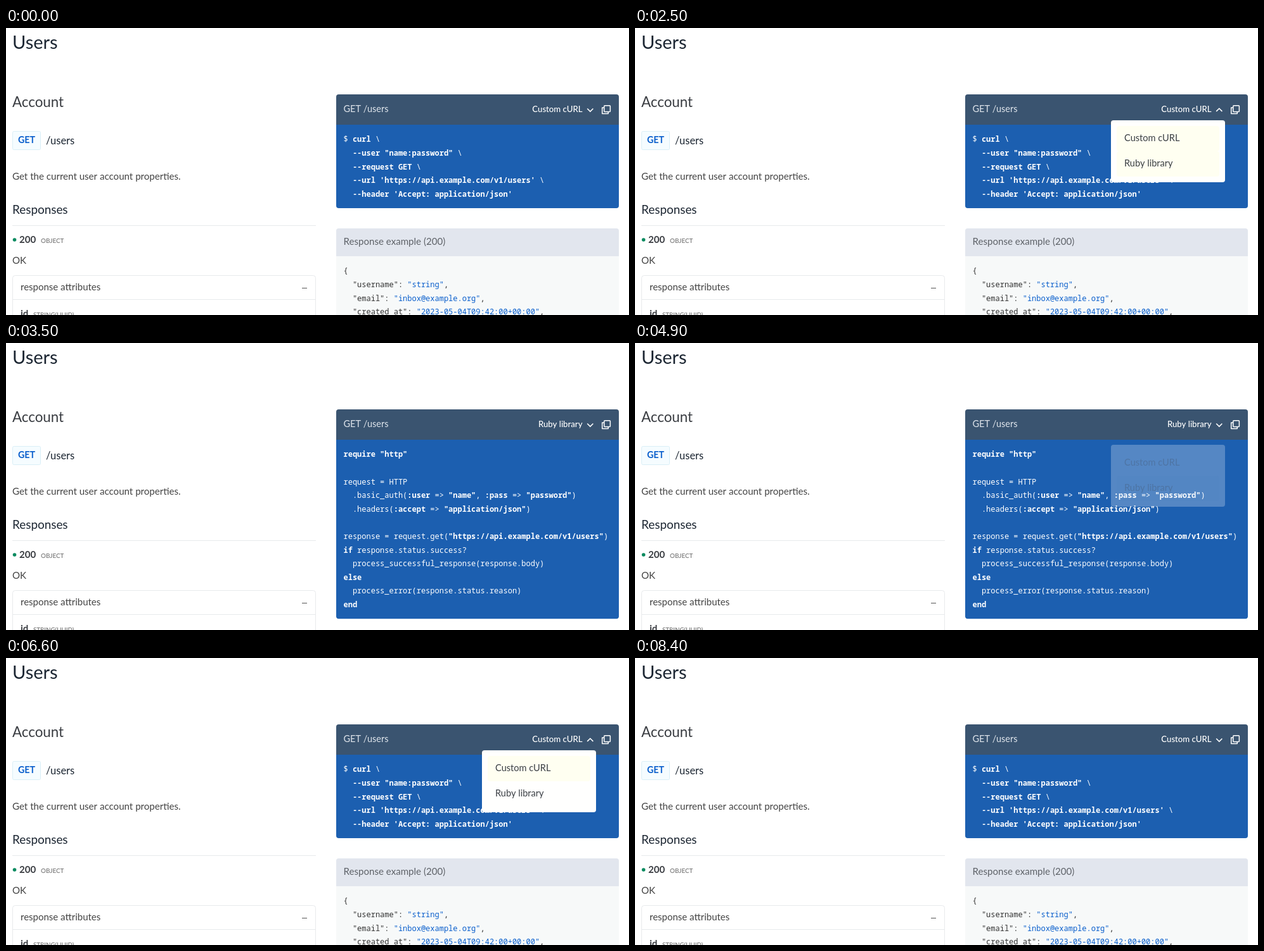
Recreate the animation shown at these times as an HTML page with a canvas. Size 983 px wide and 454 px high, loop 9.4 s.

```html
<!DOCTYPE html>
<html lang="en">
<head>
<meta charset="utf-8">
<title>API reference</title>
<style>
  html, body { margin: 0; width: 100%; height: 100%; overflow: hidden; background: #fff; }
  canvas { display: block; width: 983px; height: 454px; }
</style>
</head>
<body>
<canvas id="stage"></canvas>
<script>
const WIDTH = 983, HEIGHT = 454, LOOP = 9400;
const canvas = document.getElementById('stage');
const ctx = canvas.getContext('2d');
const ratio = window.devicePixelRatio || 1;
canvas.width = WIDTH * ratio;
canvas.height = HEIGHT * ratio;

const SANS = 'Lato, "Open Sans", sans-serif';
const MONO = '"Noto Sans Mono", "DejaVu Sans Mono", monospace';
const INK = '#1d2733', BODY = '#444', LINE = '#e8eaec', LINK = '#0a5fcc';
const HEADER = '#3a5470', PANEL = '#1c5fb0';
const CODE_TOP = 153, LINE_HEIGHT = 21.6, PADDING = 12;

// Asterisks toggle the emphasised style.
const CURL = [
  '$ *curl* \\',
  '  *--user "name:password"* \\',
  '  *--request GET* \\',
  '  *--url \'https://api.example.com/v1/users\'* \\',
  '  *--header \'Accept: application/json\'*'
];
const RUBY = [
  '*require "http"*',
  '',
  'request = HTTP',
  '  .basic_auth(*:user* => *"name"*, *:pass* => *"password"*)',
  '  .headers(*:accept* => *"application/json"*)',
  '',
  'response = request.get(*"https://api.example.com/v1/users"*)',
  '*if* response.status.success?',
  '  process_successful_response(response.body)',
  '*else*',
  '  process_error(response.status.reason)',
  '*end*'
];
const JSON_LINES = [
  '{',
  '  "username": *"string"*,',
  '  "email": *"inbox@example.org"*,',
  '  "created_at": *"2023-05-04T09:42:00+00:00"*,'
];
const LANGUAGES = ['Custom cURL', 'Ruby library'];

// [start time, visibility], held until the next entry
const MENU_STEPS = [
  [0, 0], [1800, 0.75], [1900, 0.96], [2000, 1], [3300, 0.75], [3400, 0.25], [3500, 0],
  [4900, 0.25], [5000, 0.8], [5100, 1], [6700, 0.75], [6800, 0.25], [6900, 0]
];
const TOOLTIP_STEPS = [[0, 0], [7700, 0.4], [7800, 0.8], [7900, 1], [8400, 0]];

const between = (t, from, to) => t >= from && t < to;

function valueAt(steps, t) {
  let value = 0;
  for (const [start, v] of steps) if (t >= start) value = v;
  return value;
}

function text(str, x, y, size, color, weight = 400, align = 'left') {
  ctx.font = `${weight} ${size}px ${SANS}`;
  ctx.textAlign = align;
  ctx.fillStyle = color;
  ctx.fillText(str, x, y);
}

function box(x, y, w, h, radius, fill, stroke) {
  ctx.beginPath();
  ctx.roundRect(x, y, w, h, radius);
  if (fill) {
    ctx.fillStyle = fill;
    ctx.fill();
  }
  if (stroke) {
    ctx.strokeStyle = stroke;
    ctx.lineWidth = 1;
    ctx.stroke();
  }
}

function polyline(points, color, width) {
  ctx.beginPath();
  points.forEach(([x, y]) => ctx.lineTo(x, y));
  ctx.strokeStyle = color;
  ctx.lineWidth = width;
  ctx.stroke();
}

function code(lines, top, plain, strong) {
  ctx.textAlign = 'left';
  lines.forEach((line, row) => {
    const y = Math.round(top + PADDING + 15.3 + row * LINE_HEIGHT);
    let x = 532.5;
    line.split('*').forEach((part, i) => {
      const style = i % 2 ? strong : plain;
      ctx.font = `${style.weight} 12px ${MONO}`;
      ctx.fillStyle = style.color;
      ctx.fillText(part, x, y);
      x += ctx.measureText(part).width;
    });
  });
}

function drawReference() {
  text('Users', 10, 33, 29, INK);
  text('Account', 10, 125, 22.3, '#3a3d42');

  box(10.5, 163.5, 44, 29, 2, '#f5fcff', '#daeff7');
  text('GET', 19, 182, 14.2, LINK, 700);
  text('/users', 63, 184, 16.5, INK);
  text('Get the current user account properties.', 10, 240, 15.1, BODY);

  text('Responses', 10, 294, 18.9, INK);
  polyline([[10, 312.5], [489, 312.5]], LINE, 1);
  ctx.beginPath();
  ctx.arc(13.5, 335, 2.8, 0, 2 * Math.PI);
  ctx.fillStyle = '#0b8a5f';
  ctx.fill();
  text('200', 21, 340, 15, '#3a3d42', 700);
  text('OBJECT', 55, 340, 9.9, '#666');
  text('OK', 10, 373, 15.1, BODY);

  box(10.5, 391.5, 478, 90, 4, null, LINE);
  polyline([[10, 429.5], [489, 429.5]], LINE, 1);
  text('response attributes', 23, 415, 15, BODY);
  polyline([[467, 411.5], [475, 411.5]], '#555', 1);
  text('id', 23, 457, 15, '#3a3d42', 700);
  text('STRING(UUID)', 43, 457, 9.8, '#666');
}

function drawChevron(turn) {
  ctx.save();
  ctx.translate(921.8, 129.7);
  ctx.rotate(-Math.PI * turn);
  polyline([[-4.6, -2.2], [0, 2.4], [4.6, -2.2]], '#fff', 1.6);
  ctx.restore();
}

function drawCopyIcon() {
  ctx.lineJoin = 'round';
  ctx.beginPath();
  ctx.roundRect(943.8, 122.8, 9.6, 9.6, 1);
  ctx.strokeStyle = '#fff';
  ctx.lineWidth = 1.5;
  ctx.stroke();
  polyline([[943.8, 126], [940.7, 126], [940.7, 135.5], [950.2, 135.5], [950.2, 132.4]], '#fff', 1.5);
  ctx.lineJoin = 'miter';
}

function drawRequest(selected, menu) {
  const lines = selected ? RUBY : CURL;
  const height = lines.length * LINE_HEIGHT + 2 * PADDING;
  box(521, 105, 446, 48, [4, 4, 0, 0], HEADER);
  box(521, CODE_TOP, 446, height, [0, 0, 4, 4], PANEL);
  text('GET /users', 532.5, 133, 14.5, '#dde3ea');
  text(LANGUAGES[selected], 909.5, 133, 13.2, '#fff', 500, 'right');
  drawChevron(menu ** 4.8);
  drawCopyIcon();
  code(lines, CODE_TOP, { color: '#fff', weight: 400 }, { color: '#fff', weight: 600 });
  return CODE_TOP + height;
}

function drawResponse(top) {
  box(521, top, 446, 44, [4, 4, 0, 0], '#e2e6ee');
  box(521, top + 44, 446, 140, 0, '#f7f9f9');
  text('Response example (200)', 532.5, top + 26, 15.1, '#5e6268');
  code(JSON_LINES, top + 44, { color: '#333', weight: 400 }, { color: LINK, weight: 400 });
}

function drawMenu(visible, selected, hovering) {
  if (!visible) return;
  ctx.save();
  ctx.globalAlpha = visible;
  ctx.translate(0, Math.round(20 * (1 - visible)));
  box(751, 146, 180, 98, 4, '#fffffe');
  const tint = visible < 1 ? 'rgba(28, 95, 176, 0.09)' : '#fffff1';
  LANGUAGES.forEach((label, i) => {
    const y = 155 + 40 * i;
    if (i === selected || hovering) box(760, y, 162, 40, 4, tint);
    text(label, 772, y + 24, 14.6, '#3c4046');
  });
  ctx.restore();
}

function drawTooltip(visible) {
  if (!visible) return;
  ctx.save();
  ctx.globalAlpha = visible;
  box(908, 149, 59, 23, 3, '#1f2d3d');
  text('Copied!', 937.5, 165, 12, '#fff', 400, 'center');
  ctx.restore();
}

function draw(t) {
  ctx.setTransform(ratio, 0, 0, ratio, 0, 0);
  ctx.fillStyle = '#fff';
  ctx.fillRect(0, 0, WIDTH, HEIGHT);

  const selected = between(t, 3200, 6600) ? 1 : 0;
  const hovering = between(t, 2000, 3200) || between(t, 5100, 6600);
  const menu = valueAt(MENU_STEPS, t);
  drawReference();
  const bottom = drawRequest(selected, menu);
  drawResponse(Math.round(bottom) + 32);
  drawMenu(menu, selected, hovering);
  drawTooltip(valueAt(TOOLTIP_STEPS, t));
}

const start = performance.now();
function tick() {
  draw((performance.now() - start) % LOOP);
  requestAnimationFrame(tick);
}
tick();
</script>
</body>
</html>
```
